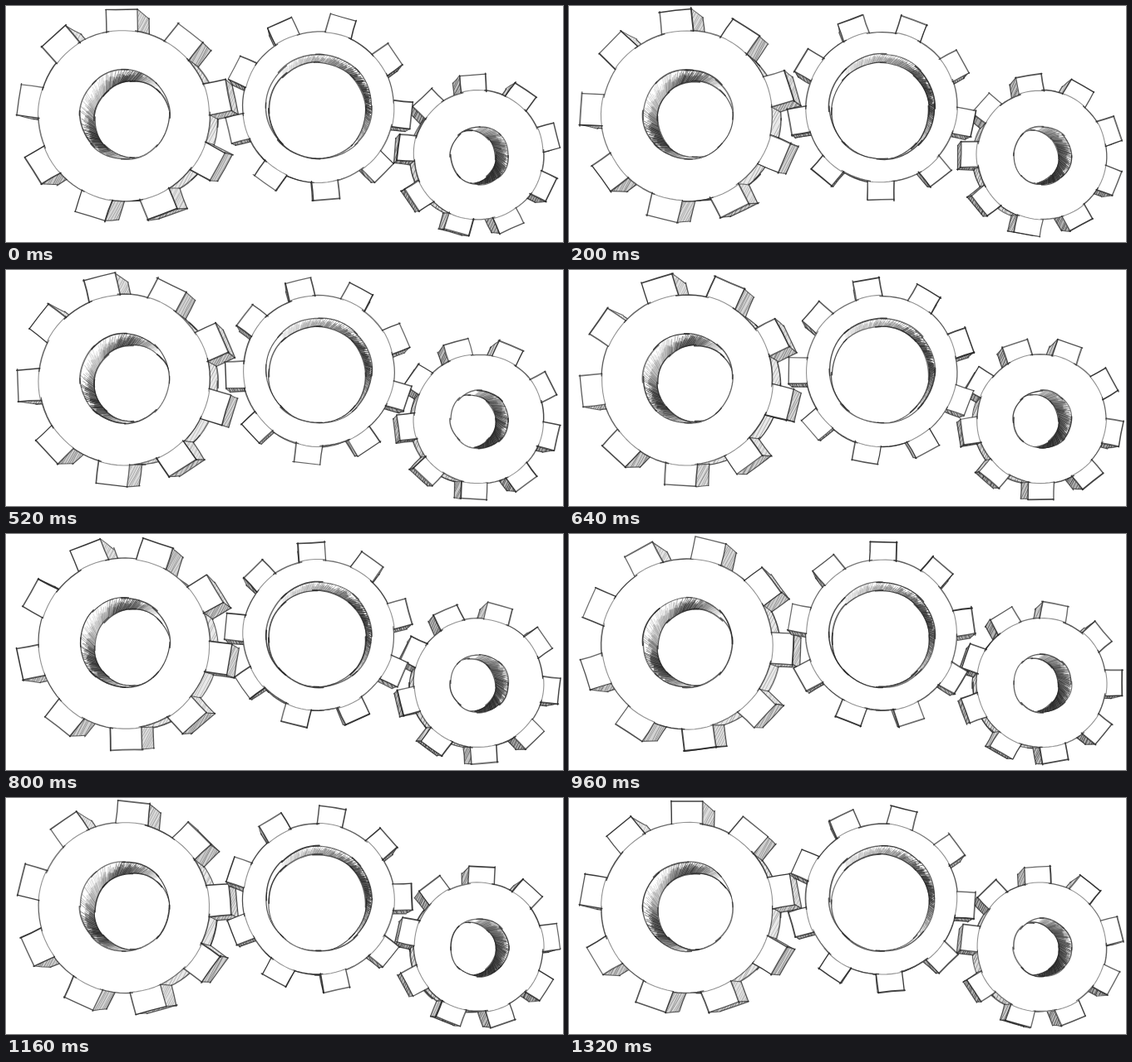
These frames come from a looping animation (670x285 px, 1.36 s). An HTML page with a canvas:

```html
<!DOCTYPE html>
<html lang="en">
<head>
<meta charset="utf-8">
<title>Sketched gears</title>
<style>
  html, body { margin: 0; width: 100%; height: 100%; overflow: hidden; background: #fff; }
  canvas { display: block; }
</style>
</head>
<body>
<canvas id="stage" width="670" height="285"></canvas>
<script>
const ctx = document.getElementById('stage').getContext('2d');
const STEP = 40, STEPS = 34, TEETH = 9, TAU = Math.PI * 2;
const rad = deg => deg * Math.PI / 180;

// start: clockwise degrees from the top; shift and scale place the far face.
// dark: [angle, spread, strength] patches of shading inside the hole.
const gears = [
  { x: 568.5, y: 180, r: 78, tip: 97, half: 15.5, start: 357, dir: -1,
    shift: [-9, 4], scale: .95, shade: .95, hatch: 115,
    hole: { outer: [569.5, 180.5, 35], inner: [557, 182.5, 32], from: -80, to: 75, length: 24, tilt: .7,
            dark: [[40, 50, .95], [-35, 45, .5]] } },
  { x: 142, y: 132.5, r: 103, tip: 128, half: 19, start: 0, dir: -1,
    shift: [15, 5], scale: .95, shade: .55, hatch: 118,
    hole: { outer: [143, 131, 54], inner: [152.5, 137, 46], from: 95, to: 300, length: 22, tilt: .8,
            dark: [[145, 32, .9], [255, 28, .75], [200, 50, .15]] } },
  { x: 376, y: 122, r: 91, tip: 112, half: 15.8, start: 334, dir: 1,
    shift: [-1, 5], scale: .95, shade: .85, hatch: 65,
    hole: { outer: [376.5, 121.5, 63.5], inner: [374.5, 126.5, 58.5], from: -135, to: 35, length: 14, tilt: .6,
            dark: [[-15, 38, 1], [-55, 40, .4], [-100, 35, .2]] } }
];

let seed = 1;
function random() {
  seed = seed + 0x6D2B79F5 | 0;
  let n = Math.imul(seed ^ seed >>> 15, 1 | seed);
  n = n + Math.imul(n ^ n >>> 7, 61 | n) ^ n;
  return ((n ^ n >>> 14) >>> 0) / 4294967296;
}
const wobble = size => (random() - .5) * 2 * size;

function pencil(width, alpha) {
  ctx.lineWidth = width;
  ctx.strokeStyle = `rgba(38,38,38,${alpha})`;
  ctx.stroke();
}

function line([x1, y1], [x2, y2], width, alpha, loose = .6) {
  const over = random() * .03;
  const dx = (x2 - x1) * over, dy = (y2 - y1) * over;
  ctx.beginPath();
  ctx.moveTo(x1 - dx + wobble(loose), y1 - dy + wobble(loose));
  ctx.quadraticCurveTo((x1 + x2) / 2 + wobble(loose), (y1 + y2) / 2 + wobble(loose),
    x2 + dx + wobble(loose), y2 + dy + wobble(loose));
  pencil(width, alpha);
}

function arc(x, y, r, from, to, width, alpha) {
  const phase = random() * TAU, count = Math.max(3, Math.ceil((to - from) / .08));
  ctx.beginPath();
  for (let i = 0; i <= count; i++) {
    const a = from + (to - from) * i / count;
    const d = r + Math.sin(a * 4 + phase) * .6;
    ctx.lineTo(x + Math.cos(a) * d, y + Math.sin(a) * d);
  }
  pencil(width, alpha);
}

function circle([x, y, r]) {
  const parts = 8, size = TAU / parts;
  for (let i = 0; i < parts; i++) {
    const a = i * size;
    arc(x, y, r, a - random() * .12, a + size + random() * .12, 1.1 + random() * .7, .6 + random() * .3);
  }
}

function disc(x, y, r) {
  ctx.beginPath();
  ctx.arc(x, y, r, 0, TAU);
}

function polygon(points) {
  ctx.beginPath();
  points.forEach(p => ctx.lineTo(...p));
  ctx.closePath();
}

function hatch(x, y, size, angle, gap, alpha) {
  const c = Math.cos(angle), s = Math.sin(angle);
  for (let d = -size; d < size; d += gap * (.7 + random() * .6)) {
    const px = x - s * d, py = y + c * d;
    line([px - c * size, py - s * size], [px + c * size, py + s * size], .9, alpha * (.6 + random() * .5), 1.5);
  }
}

function toothPoints(g, angle) {
  const c = Math.cos(angle), s = Math.sin(angle), base = Math.sqrt(g.r ** 2 - g.half ** 2);
  return [[base, -1], [g.tip, -1], [g.tip, 1], [base, 1]].map(([d, side]) =>
    [g.x + c * d - s * side * g.half, g.y + s * d + c * side * g.half]);
}

function drawSides(g, points, angle) {
  const back = ([x, y]) => [g.x + g.shift[0] + (x - g.x) * g.scale, g.y + g.shift[1] + (y - g.y) * g.scale];
  for (let i = 0; i < 3; i++) {
    const p = points[i], q = points[i + 1], bp = back(p), bq = back(q);
    const normal = angle + (i - 1) * Math.PI / 2, ny = Math.sin(normal);
    const mx = (p[0] + q[0]) / 2, my = (p[1] + q[1]) / 2, far = back([mx, my]);
    if (Math.cos(normal) * (far[0] - mx) + ny * (far[1] - my) <= 0) continue;
    const shade = g.shade * (.65 + .35 * ny);
    ctx.save();
    polygon([p, q, bq, bp]);
    ctx.fillStyle = '#fff';
    ctx.fill();
    ctx.fillStyle = `rgba(60,60,60,${shade * .5})`;
    ctx.fill();
    ctx.clip();
    hatch((mx + far[0]) / 2, (my + far[1]) / 2, g.half * 1.5, rad(g.hatch), 2.5, shade);
    ctx.restore();
    line(bp, bq, 1.3, .75);
    line(p, bp, 1.1, .7);
    line(q, bq, 1.1, .7);
  }
}

function drawBackRim(g) {
  const x = g.x + g.shift[0], y = g.y + g.shift[1], r = g.r * g.scale;
  ctx.save();
  disc(x, y, r);
  ctx.fillStyle = '#fff';
  ctx.fill();
  ctx.fillStyle = `rgba(60,60,60,${g.shade * .2})`;
  ctx.fill();
  ctx.clip();
  hatch(x, y, r, rad(g.hatch), 3.5, g.shade * .65);
  ctx.restore();
  circle([x, y, r]);
}

function drawHole({ outer, inner, from, to, length, tilt, dark }) {
  const [x, y, r] = inner;
  ctx.save();
  disc(...outer);
  ctx.clip();
  for (let deg = from; deg < to; deg += 1.6 + random()) {
    const shade = dark.reduce((sum, [at, spread, strength]) =>
      sum + strength * Math.exp(-(((deg - at) / spread) ** 2)), 0);
    const a = rad(deg), b = a + tilt, reach = length * (.75 + random() * .5);
    const p = [x + Math.cos(a) * (r - 2), y + Math.sin(a) * (r - 2)];
    const along = d => [p[0] + Math.cos(b) * d, p[1] + Math.sin(b) * d];
    line(p, along(reach * .6), 3, shade * .5);
    line(p, along(reach), .9, Math.min(.9, shade * .85));
  }
  disc(...inner);
  ctx.fillStyle = '#fff';
  ctx.fill();
  circle(inner);
  ctx.restore();
  circle(outer);
}

function drawGear(g, turn) {
  const pitch = TAU / TEETH, spread = Math.asin(g.half / g.r);
  const angles = Array.from({ length: TEETH }, (_, i) => rad(g.start - 90) + (i + g.dir * turn) * pitch);
  const teeth = angles.map(a => toothPoints(g, a));

  drawBackRim(g);
  teeth.forEach((points, i) => drawSides(g, points, angles[i]));

  ctx.fillStyle = '#fff';
  disc(g.x, g.y, g.r);
  ctx.fill();
  teeth.forEach((points, i) => {
    polygon(points);
    ctx.fill();
    for (let k = 0; k < 3; k++) line(points[k], points[k + 1], 1.2 + random() * .7, .65 + random() * .3);
    arc(g.x, g.y, g.r, angles[i] - spread, angles[i] + spread, 1.1, .5);
    arc(g.x, g.y, g.r, angles[i] + spread - .03, angles[i] + pitch - spread + .03, 1.2 + random() * .5, .6 + random() * .25);
  });
  drawHole(g.hole);
}

function draw(now) {
  const step = Math.floor(now / STEP) % STEPS, t = step / STEPS;
  // The turn speeds up and slows down a little once per loop.
  const turn = t - .015 + .047 * Math.cos(t * TAU);
  seed = 977 * (step + 1);
  ctx.fillStyle = '#fff';
  ctx.fillRect(0, 0, 670, 285);
  ctx.lineCap = ctx.lineJoin = 'round';
  gears.forEach(g => drawGear(g, turn));
}

let begin;
function tick(now) {
  begin ??= now;
  draw(now - begin);
  requestAnimationFrame(tick);
}
draw(0);
requestAnimationFrame(tick);
</script>
</body>
</html>
```
